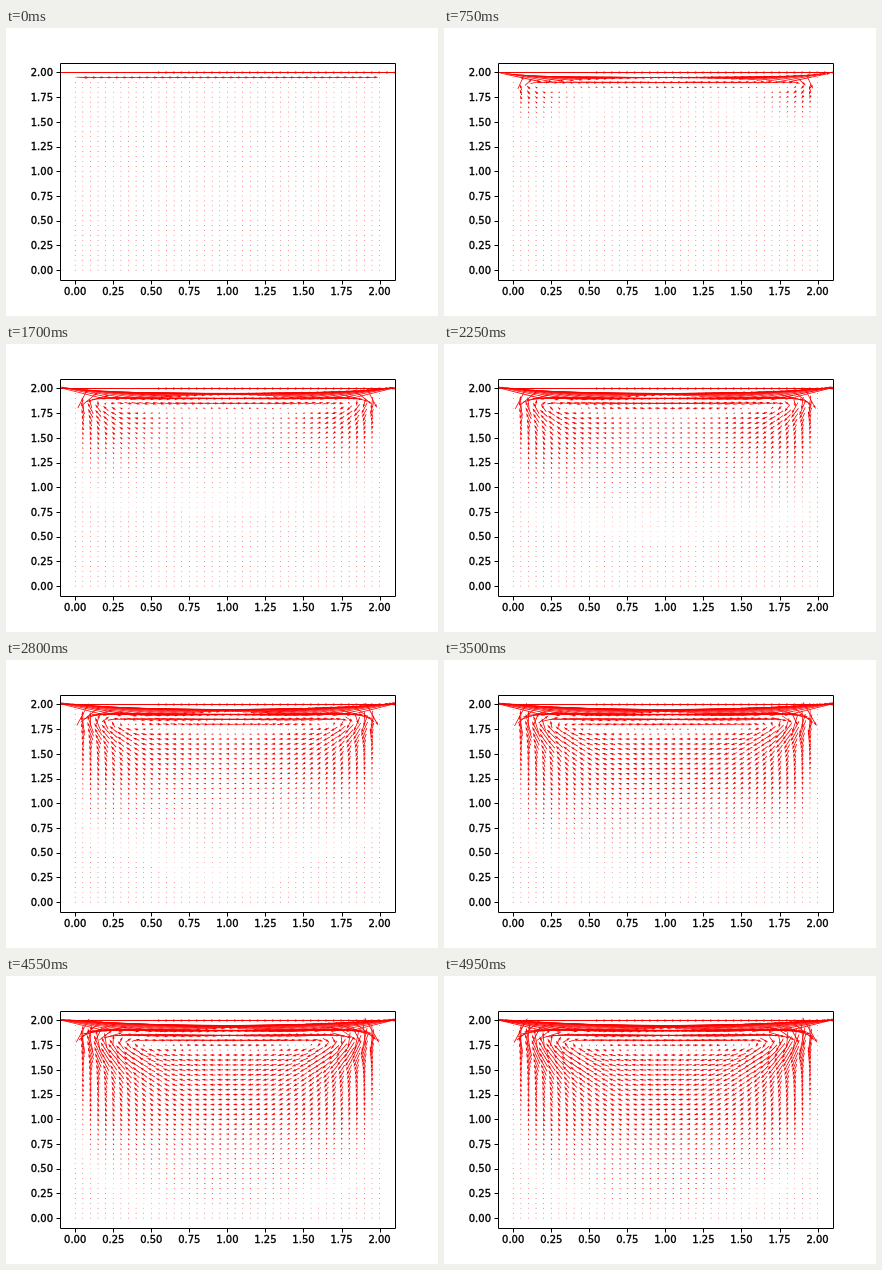
Write an HTML page with a canvas that moves like this. It is 432 px wide and 288 px high and loops after 5000 ms.

```html
<!DOCTYPE html>
<html lang="en">
<head>
<meta charset="utf-8">
<title>Cavity flow</title>
<style>
  html, body { margin: 0; width: 100%; height: 100%; overflow: hidden; background: #fff; }
  canvas, svg { position: absolute; left: 0; top: 0; width: 432px; height: 288px; }
  text { font: 10px "DejaVu Sans", sans-serif; stroke: #000; stroke-width: .35px; }
  path { fill: none; stroke: #000; }
</style>
</head>
<body>
<canvas id="field" width="432" height="288"></canvas>
<svg id="axes" viewBox="0 0 432 288"></svg>
<script>
const N = 41, H = 0.05, DT = 0.001, NU = 0.1;
const FRAMES = 100, FRAME_MS = 50, WARMUP = 3, PRESSURE_PASSES = 50;
const BOX = { x: 54, y: 34.56, w: 334.8, h: 217.44 };
const toX = v => BOX.x + (v + 0.1) / 2.2 * BOX.w;
const toY = v => BOX.y + BOX.h - (v + 0.1) / 2.2 * BOX.h;

// Lid-driven cavity: the top wall slides right with speed 1.
const grid = () => new Float64Array(N * N);
let u = grid(), v = grid(), p = grid();
const b = grid();

function eachInner(fn) {
  for (let j = 1; j < N - 1; j++)
    for (let i = 1; i < N - 1; i++) fn(j * N + i);
}

function solvePressure() {
  eachInner(k => {
    const ux = (u[k + 1] - u[k - 1]) / (2 * H), uy = (u[k + N] - u[k - N]) / (2 * H);
    const vx = (v[k + 1] - v[k - 1]) / (2 * H), vy = (v[k + N] - v[k - N]) / (2 * H);
    b[k] = (ux + vy) / DT - ux * ux - 2 * uy * vx - vy * vy;
  });
  for (let pass = 0; pass < PRESSURE_PASSES; pass++) {
    const q = p.slice();
    eachInner(k => {
      p[k] = (q[k + 1] + q[k - 1] + q[k + N] + q[k - N] - H * H * b[k]) / 4;
    });
    for (let j = 0; j < N; j++) p[j * N + N - 1] = p[j * N + N - 2];
    for (let i = 0; i < N; i++) p[i] = p[N + i];
    for (let j = 0; j < N; j++) p[j * N] = p[j * N + 1];
    p.fill(0, N * (N - 1));
  }
}

function step() {
  solvePressure();
  const un = u, vn = v, r = DT / H;
  u = grid();
  v = grid();
  const advance = (f, k, d) =>
    f[k] - r * (un[k] * (f[k] - f[k - 1]) + vn[k] * (f[k] - f[k - N]))
    - r / 2 * (p[k + d] - p[k - d])
    + NU * r / H * (f[k + 1] + f[k - 1] + f[k + N] + f[k - N] - 4 * f[k]);
  eachInner(k => {
    u[k] = advance(un, k, 1);
    v[k] = advance(vn, k, N);
  });
  u.fill(1, N * (N - 1));
}

for (let n = 0; n < WARMUP; n++) step();
const frames = [{ u, v }];
while (frames.length < FRAMES) {
  step();
  frames.push({ u, v });
}

// Arrow lengths are measured in shaft widths.
const SHAFT = 0.0024 * BOX.w;
const mean = u.reduce((sum, _, k) => sum + Math.hypot(frames[0].u[k], frames[0].v[k]), 0) / (N * N);
const SCALE = BOX.w / (1.8 * mean * Math.sqrt(N * N)) / SHAFT;

const dot = Array.from({ length: 6 }, (_, n) =>
  [Math.cos(n * Math.PI / 3) / 2, Math.sin(n * Math.PI / 3) / 2]);

function arrow(len) {
  if (len < 1) return dot;
  const s = Math.min(1, len / 5), tip = len / 2, neck = tip - 4.5 * s, barb = tip - 5 * s;
  return [[-tip, s / 2], [neck, s / 2], [barb, 1.5 * s], [tip, 0],
          [barb, -1.5 * s], [neck, -s / 2], [-tip, -s / 2]];
}

const ctx = document.getElementById("field").getContext("2d");
ctx.beginPath();
ctx.rect(BOX.x, BOX.y, BOX.w, BOX.h);
ctx.clip();
ctx.fillStyle = "#f00";

function draw({ u, v }) {
  ctx.clearRect(0, 0, 432, 288);
  for (let k = 0; k < N * N; k++) {
    const speed = Math.hypot(u[k], v[k]);
    const c = speed ? u[k] / speed : 1, s = speed ? v[k] / speed : 0;
    const x0 = toX(k % N * H), y0 = toY(Math.floor(k / N) * H);
    ctx.beginPath();
    for (const [x, y] of arrow(speed * SCALE))
      ctx.lineTo(x0 + (x * c - y * s) * SHAFT, y0 - (x * s + y * c) * SHAFT);
    ctx.fill();
  }
}

function drawAxes() {
  let lines = "M54.5 35.5H389.5V252.5H54.5Z", labels = "";
  for (let n = 0; n <= 8; n++) {
    const t = n / 4, x = toX(t), y = toY(t), text = t.toFixed(2);
    lines += `M${Math.round(x) + 0.5} 252.5v4M54.5 ${Math.round(y) + 0.5}h-4`;
    labels += `<text x="${x}" y="267" text-anchor="middle">${text}</text>` +
              `<text x="47" y="${Math.round(y + 3.65)}" text-anchor="end">${text}</text>`;
  }
  document.getElementById("axes").innerHTML = `<path d="${lines}"/>${labels}`;
}

drawAxes();
const start = performance.now();
let shown = -1;
function tick() {
  const n = Math.floor((performance.now() - start) / FRAME_MS) % FRAMES;
  if (n !== shown) draw(frames[shown = n]);
  requestAnimationFrame(tick);
}
tick();
</script>
</body>
</html>
```
